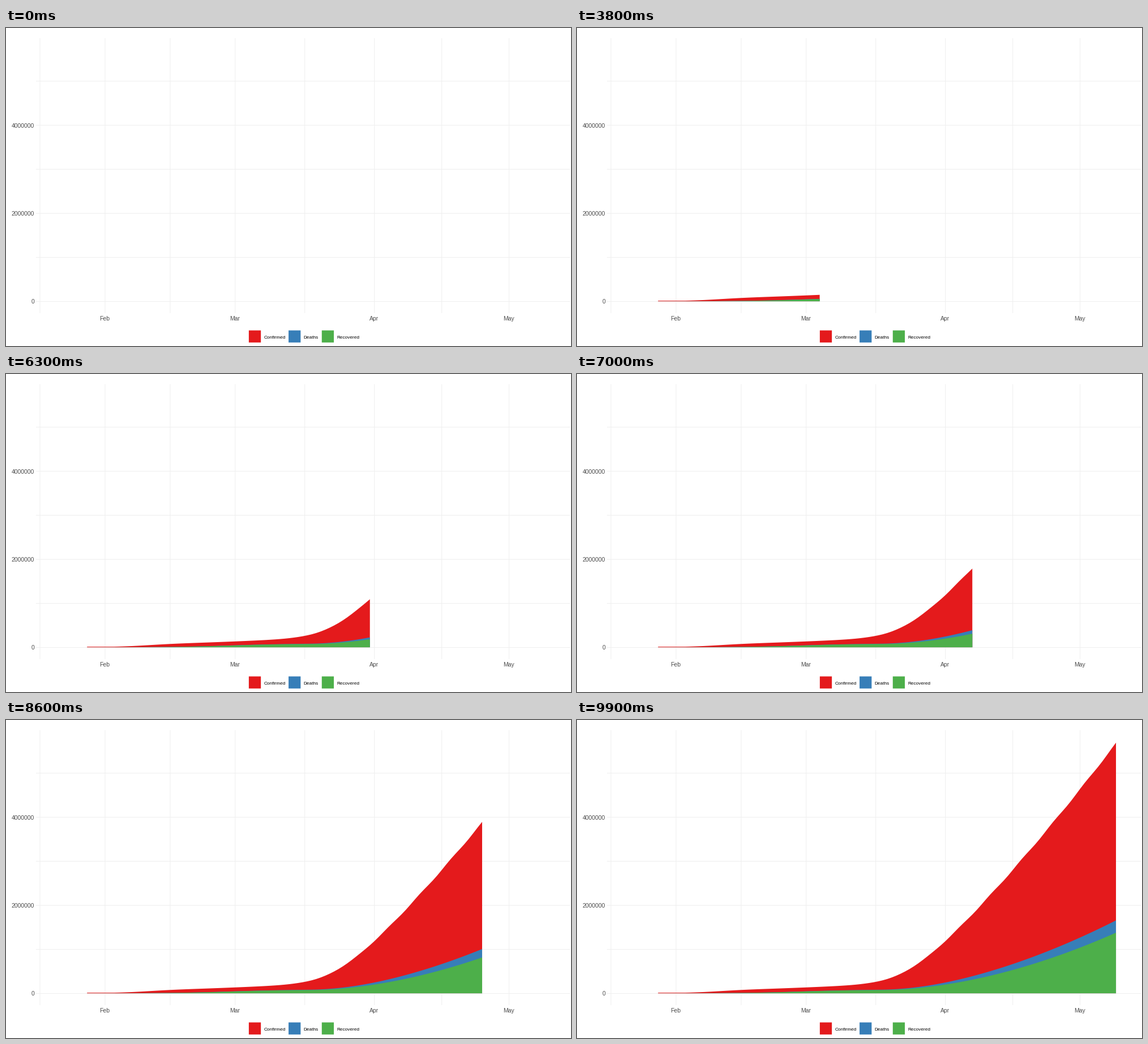
A matplotlib script that plays this animation: 998 px wide and 561 px high, repeating every 10000 ms.

```python
import numpy as np
import matplotlib.pyplot as plt
from matplotlib.animation import FuncAnimation
from matplotlib.patches import Polygon, Rectangle

W, H, DPI = 998, 561, 128
PT = 72 / DPI                      # points per pixel
FRAMES, SPAN = 100, 108            # loop length, days on the timeline
FIRST, LAST = -4, 98               # visible days, counted from 1 February
X0, DAY = 174.9, 7.93              # 1 February, pixels per day
Y0, UNIT = 482.1, 0.07775          # baseline, pixels per thousand cases

RED, BLUE, GREEN = "#E41A1C", "#377EB8", "#4DAF4A"
GRID, GREY = "#EFEFEF", "#4D4D4D"

fig = plt.figure(figsize=(W / DPI, H / DPI), dpi=DPI, facecolor="white")
ax = fig.add_axes([0, 0, 1, 1])
ax.set_xlim(0, W)
ax.set_ylim(H, 0)
ax.axis("off")


def label(x, y, text, size, color, ha):
    ax.text(x, y, text, fontsize=size * PT, color=color, ha=ha,
            va="baseline", family="Liberation Sans")


def line(xs, ys):
    ax.plot(xs, ys, color=GRID, lw=PT, solid_capstyle="butt",
            snap=False, zorder=1)


def logistic(d, mid, width):
    return 1 / (1 + np.exp((mid - d) / width))


def ramp(d, start, width):
    """Smooth bend from flat to a slope of one per day."""
    return width * np.log1p(np.exp((d - start) / width))


# Grid and axis labels
months = dict(zip(("Feb", "Mar", "Apr", "May"), X0 + DAY * np.array([0, 29, 60, 90])))
majors = np.array(list(months.values()))
middles = (majors[1:] + majors[:-1]) / 2
for x in (*majors, *middles, 1.5 * majors[0] - 0.5 * majors[1]):
    line([x, x], [18, 503])
for name, x in months.items():
    label(x - 0.6, 516, name, 10.4, GREY, "center")

for million in range(6):
    y = 482.5 - million * 1000 * UNIT
    line([53, 996], [y, y])
    if million % 2 == 0:
        label(50.2, round(y + 4), str(million * 10**6), 10.4, GREY, "right")

# Legend
for x, color, name in ((428.9, RED, "Confirmed"), (499.1, BLUE, "Deaths"),
                       (557.8, GREEN, "Recovered")):
    ax.add_patch(Rectangle((x, 533.5), 21.3, 21.3, fc=color, lw=0, snap=False))
    label(x + 26.4, 548, name, 8.25, "black", "left")

# Cumulative cases in thousands: a first wave, then a worldwide one
days = np.arange(FIRST, LAST + 1)
weekly = 12 * logistic(days, 60, 4) * np.cos(2 * np.pi * (days - 77) / 7)
confirmed = 85 * logistic(days, 9.5, 4) + 82 * ramp(days, 50, 4.5) + weekly
deaths = 3 * logistic(days, 14, 4) + 6.3 * ramp(days, 54.2, 4.5)
recovered = (78 * logistic(days, 28, 6)
             + 1297 * np.clip((days - 46) / 52, 0, None) ** 1.81)

xs = X0 + DAY * days
heights = [np.maximum((recovered + deaths + confirmed) * UNIT, 1),
           (recovered + deaths) * UNIT, recovered * UNIT]

# Nested areas, tallest at the back
areas = [ax.add_patch(Polygon([[0, 0]] * 3, closed=True, fc=color, lw=0,
                              snap=False, zorder=3 + z))
         for z, color in enumerate((RED, BLUE, GREEN))]


def last_day(i):
    """Latest day whose rounded place on the timeline has been reached."""
    return max(k for k in range(SPAN + 1)
               if round((FRAMES - 1) * k / SPAN) <= i) - 10


def update(i):
    n = last_day(i) - FIRST + 1
    for area, h in zip(areas, heights):
        area.set_visible(n > 1)
        if n > 1:
            top = np.column_stack([xs[:n], Y0 - h[:n]])
            area.set_xy(np.vstack([top, [xs[n - 1], Y0], [xs[0], Y0]]))
    return areas


anim = FuncAnimation(fig, update, frames=FRAMES, init_func=lambda: update(0),
                     interval=100, repeat=True, repeat_delay=0)
plt.show()
```
